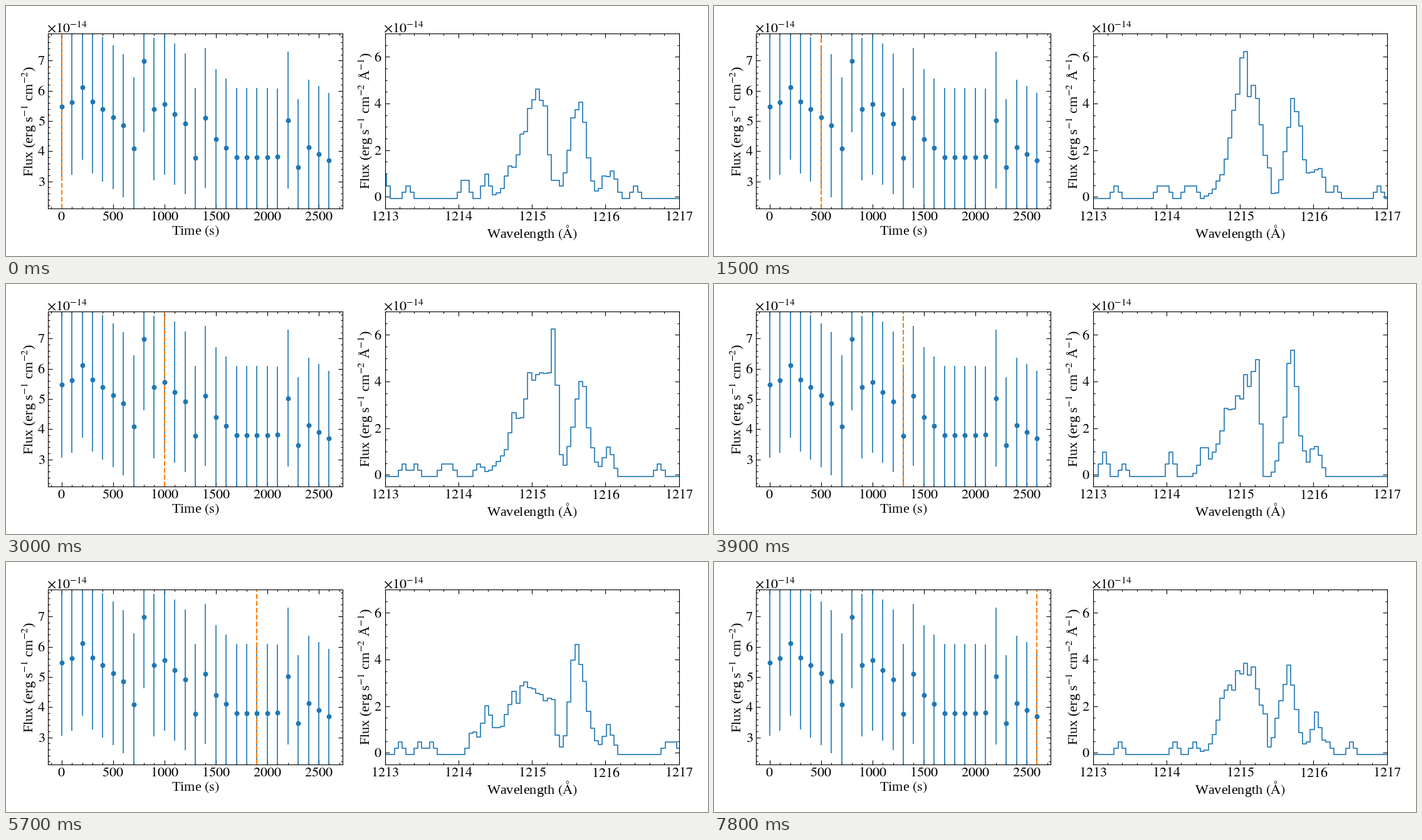
These frames come from a looping animation (1120 by 400 pixels, 8.1 s). A matplotlib script:

```python
import numpy as np
import matplotlib.pyplot as plt
from matplotlib.animation import FuncAnimation
from matplotlib.ticker import AutoMinorLocator, MultipleLocator

plt.rcParams.update({
    "font.family": "Liberation Serif", "font.size": 16,
    "mathtext.fontset": "stix", "axes.linewidth": 0.8,
    "lines.linewidth": 1.2,
})

W, H, DPI = 1120, 400, 100
PANEL_W = 469.3
FRAMES, INTERVAL = 27, 300
BLUE, ORANGE = "tab:blue", "tab:orange"
STEPS = np.arange(FRAMES)
BINS = np.arange(77)
WAVE = 1212.995 + 0.05336 * BINS
BASE, PHOTON = -0.07, 0.262

# Light curve: straight runs between its turning points.
turns = {0: 5.47, 1: 5.63, 2: 6.11, 3: 5.65, 6: 4.85, 7: 4.08, 8: 6.98,
         9: 5.39, 10: 5.56, 12: 4.91, 13: 3.77, 14: 5.10, 15: 4.40,
         17: 3.80, 21: 3.81, 22: 5.03, 23: 3.46, 24: 4.12, 26: 3.69}
times = 100 * STEPS
flux = np.interp(STEPS, list(turns), list(turns.values()))
error = 2.415 - 0.0066 * STEPS

# Line shape drifting in time (positions in bins, heights in flux).
key_steps = [0, 3, 7, 10, 15, 19, 26]
shape_keys = {
    "peak": [40, 40, 38.5, 42, 39.5, 38, 39],
    "height": [4.5, 5.0, 5.3, 5.0, 3.7, 2.8, 3.8],
    "width": [6.5, 5.5, 5, 9, 7, 9, 6],
    "edge": [41.8, 45.6, 45.5, 44.6, 41.8, 43.6, 44.6],
    "red_peak": [49.5, 52.3, 50.7, 50, 51.3, 49.3, 50],
    "red_height": [3.7, 3.6, 4.1, 4.1, 4.5, 4.7, 3.4],
}


def hump(center, width):
    return np.exp(-((BINS - center) / width) ** 2)


def spectrum(k):
    """Self-absorbed double-peaked line with stray photons around it."""
    s = {name: np.interp(k, key_steps, keys) for name, keys in shape_keys.items()}
    rng = np.random.default_rng(40 + k)
    cutoff = 1 / (1 + np.exp((BINS - s["edge"]) / 0.3))
    line = s["height"] * hump(s["peak"], s["width"]) * cutoff
    line += s["red_height"] * hump(s["red_peak"], 2.7) + 1.2 * hump(57, 1.8)
    line *= 1 + 0.1 * rng.normal(size=len(BINS))
    line[line < 0.1] = 0
    stray = rng.poisson(0.12 + 0.3 * hump(28, 6))
    return BASE + line + PHOTON * np.convolve(stray, [1, 2, 1], "same")


fig = plt.figure(figsize=(W / DPI, H / DPI), dpi=DPI, facecolor="white")


def label(x, y, text, **kw):
    fig.text(x / W, 1 - y / H, text, va="baseline", **kw)


def panel(left, xlim, ylim, xstep, ystep, yminor):
    ax = fig.add_axes([left / W, 76 / H, PANEL_W / W, 280 / H])
    ax.set(xlim=xlim, ylim=ylim)
    for axis, step, minor in ((ax.xaxis, xstep, 5), (ax.yaxis, ystep, yminor)):
        axis.set_major_locator(MultipleLocator(step))
        axis.set_minor_locator(AutoMinorLocator(minor))
        axis.set_major_formatter("${x:.0f}$")
    ax.tick_params(which="both", direction="in", top=True, right=True, width=0.8)
    ax.tick_params(which="major", length=5, pad=3.5)
    ax.tick_params(which="minor", length=2.5)
    label(left - 2, 42, r"$\times 10^{-14}$", ha="left")
    return ax


light = panel(67.36, (-130, 2730), (2.1, 7.9), 500, 1, 5)
light.errorbar(times, flux, error, fmt="o", color=BLUE, markersize=4.7)
marker = light.axvline(0, color=ORANGE, ls="--", lw=1.5)

spec = panel(604.5, (1213, 1217), (-0.5, 7), 1, 2, 4)
trace, = spec.plot(WAVE, spectrum(0), color=BLUE, drawstyle="steps-mid")

upright = dict(ha="center", rotation=90, rotation_mode="anchor")
label(302, 366, r"Time $\mathrm{(s)}$", ha="center")
label(839, 371, r"Wavelength $\mathrm{(Å)}$", ha="center")
label(44, 184, r"Flux (erg s$^{-1}$ cm$^{-2}$)", **upright)
label(581, 184, r"Flux (erg s$^{-1}$ cm$^{-2}$ Å$^{-1}$)", **upright)


def update(k):
    marker.set_xdata([times[k], times[k]])
    trace.set_ydata(spectrum(k))
    return marker, trace


anim = FuncAnimation(fig, update, frames=FRAMES, interval=INTERVAL,
                     repeat=True, repeat_delay=0)
plt.show()
```
